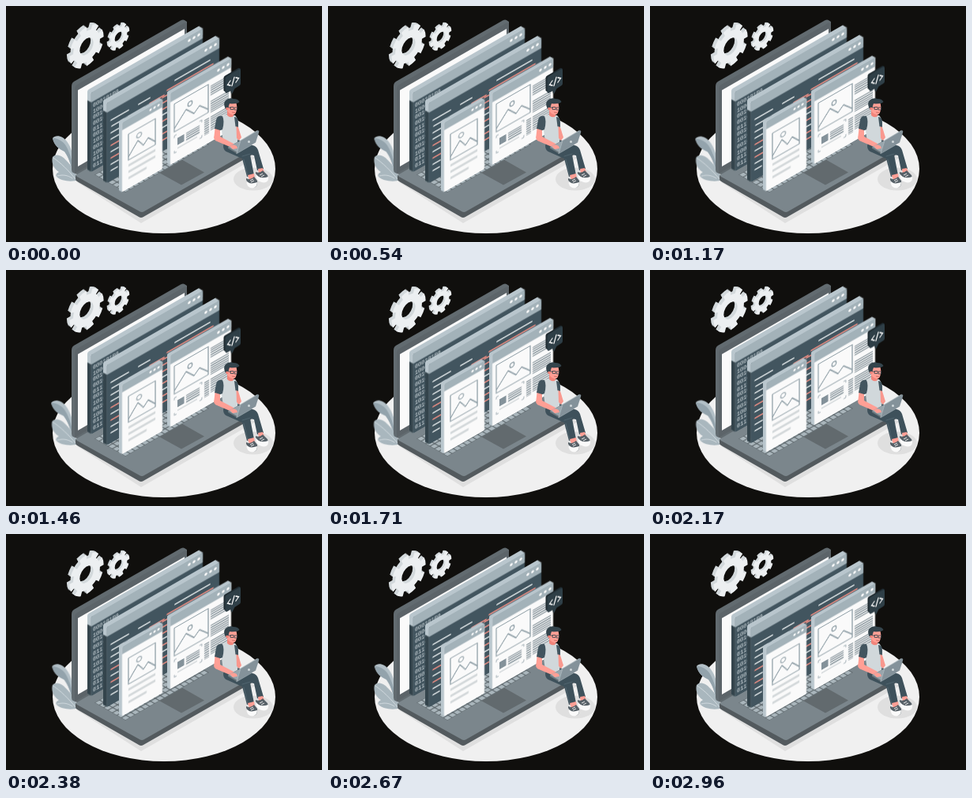
Recreate the animation shown at these times as an HTML page without scripts. Size 400x300 px, loop 3 s.

```html
<!DOCTYPE html>
<html lang="en">
<head>
<meta charset="utf-8">
<title>Coding windows</title>
<style>
html, body { margin: 0; width: 100%; height: 100%; overflow: hidden; background: #100f0d; }
svg { display: block; width: 100vw; height: 100vh; }
.rise { --h: -5px; animation: rise 3s infinite; }
.bubble { --h: -12px; }
.leaf { transform-origin: 84px 220px; animation: sway 3s ease-in-out infinite; }
.low { --a: -1.2deg; }
@keyframes rise {
  0%, 20% { transform: none; animation-timing-function: cubic-bezier(.37, 0, .63, 1); }
  80% { transform: translateY(var(--h)); animation-timing-function: cubic-bezier(.4, 0, .8, .6); }
  100% { transform: translateY(calc(var(--h) * .75)); }
}
@keyframes sway {
  50% { transform: rotate(var(--a, -2deg)); }
}
.bin { font: 6.8px "Liberation Mono", "DejaVu Sans Mono", monospace; fill: #dbe3e7; }
.line { fill: none; stroke-linecap: round; }
.pic { fill: none; stroke: #8d9da5; stroke-width: 1.2; stroke-linejoin: round; }
.top { fill: #b9c6cd; }
.bar { fill: #a3b2b9; }
.dark { fill: #42555f; }
.side { fill: #34444c; }
.pale { fill: #fafafa; }
</style>
</head>
<body>
<svg viewBox="0 0 400 300" xmlns="http://www.w3.org/2000/svg">
<defs>
  <g id="gear" fill="none" stroke="currentColor" transform="rotate(20)">
    <circle r="14.8" stroke-width="9.5"/>
    <circle r="21.5" stroke-width="7" pathLength="16" stroke-dasharray="1.1 .9"/>
  </g>
  <g id="cog">
    <g color="#d3d9dc">
      <use href="#gear" x="-4" y="-4.6"/>
      <use href="#gear" x="-3" y="-3.4"/>
      <use href="#gear" x="-2" y="-2.3"/>
      <use href="#gear" x="-1" y="-1.1"/>
    </g>
    <use href="#gear" color="#eceff1"/>
  </g>
  <pattern id="keys" width="6.2" height="5.6" patternUnits="userSpaceOnUse">
    <rect x=".6" y=".6" width="5" height="4.4" rx=".7" fill="#a9b5bb"/>
  </pattern>
  <pattern id="copy" width="30" height="2.8" patternUnits="userSpaceOnUse">
    <rect width="30" height="1.4" fill="#7c8a92"/>
  </pattern>
  <g id="dots" fill="#fafafa">
    <circle r="1.7"/><circle cx="6" r="1.7"/><circle cx="12" r="1.7"/>
  </g>
</defs>

<rect width="400" height="300" fill="#100f0d"/>
<ellipse cx="200" cy="207" rx="141" ry="82" fill="#f0f0f0"/>
<path d="M90 224 L171 276 L316 193 L290 180Z" fill="#dfdfdf"/>
<ellipse cx="313" cy="220" rx="25" ry="14.5" fill="#dfdfdf"/>

<use href="#cog" transform="translate(102 51.500) matrix(.866 -.5 0 1 0 0)"/>
<use href="#cog" transform="translate(143 39.500) matrix(.53 -.306 0 .612 0 0)"/>

<g class="leaf">
  <path d="M59 168 C63 163 72 165 77 172 C83 180 87 194 88 212 L84 212 C82 200 79 192 74 185 C68 182 61 178 59 168Z" fill="#b3c0c7"/>
  <path d="M59 168 C67 168 75 173 79 184 C83 193 85 203 86 212 L84 212 C82 200 79 192 74 185 C68 182 61 178 59 168Z" fill="#93a3ac"/>
</g>
<g class="leaf low">
  <path d="M59 192 C63 187 71 190 76 196 C83 203 89 213 92 221 C84 224 70 223 64 217 C62 214 65 212 67 211 C61 207 57 200 59 192Z" fill="#a9b7be"/>
  <path d="M60 193 C69 199 79 209 88 220 M65 216 C72 214 78 215 84 219" class="line" stroke="#d5dde1" stroke-width=".9"/>
</g>

<g id="laptop">
  <path d="M83 102 Q83 98 86 96 L221 18.500 Q224 17 226 18 L229 20 V133 L92 215 L85 212 Q83 211 83 208Z" fill="#626b70"/>
  <path d="M87 106 Q87 102 90 100 L225 22 Q229 20 229 24 V131 L87 213Z" fill="#5c6469"/>
  <path d="M91 107 L226 29 V125 L91 204Z" class="pale"/>
  <path d="M88 215 V220 Q88 222 90 223 L168 268 Q171 270 174 268 L310 190 Q313 188 313 181 L172 256Z" fill="#535a5e"/>
  <path d="M90 214 L229 132 L312 180 Q314 182 311 183 L175 261 Q172 263 169 261 L90 217 Q87 215 90 214Z" fill="#7b868c"/>
  <path d="M194 212 L223 195.500 L251 211.500 L222 227.500Z" fill="#626a6e"/>
  <g transform="matrix(1 -.577 1 .577 112 214.500)">
    <rect width="106" height="39.200" fill="#626c71"/>
    <rect width="105.400" height="39.200" fill="url(#keys)"/>
  </g>
</g>

<g class="rise">
  <g transform="translate(108 110) skewY(-30)">
    <path d="M0 101 L-5 95.200 V-4 Q-5 -5.900 -3 -5.900 H136 L141 0 V8Z" class="top"/>
    <path d="M0 101 L-5 95.200 V7 L0 12.500Z" class="side"/>
    <rect width="141" height="101" rx="1.500" class="dark"/>
    <path d="M0 12.500 V1.500 Q0 0 1.500 0 H139 Q141 0 141 2 V12.500Z" class="bar"/>
    <use href="#dots" x="124" y="5.300"/>
    <g class="bin">
      <text x="2" y="20">00010100</text>
      <text x="2" y="27.700">100001</text>
      <text x="2" y="35.400">001010</text>
      <text x="2" y="43.100">001001</text>
      <text x="2" y="50.800">011101</text>
      <text x="2" y="58.500">001010</text>
      <text x="2" y="66.200">101000</text>
      <text x="2" y="73.900">001010</text>
      <text x="2" y="81.600">100100</text>
      <text x="2" y="89.300">011101</text>
      <text x="2" y="97">011110</text>
    </g>
  </g>
</g>

<g class="rise">
  <g transform="translate(128 123) skewY(-30)">
    <path d="M0 102 L-5 96.200 V-4 Q-5 -5.900 -3 -5.900 H137 L142 0 V8Z" class="top"/>
    <path d="M0 102 L-5 96.200 V7 L0 12.500Z" class="side"/>
    <rect width="142" height="102" rx="1.500" class="dark"/>
    <path d="M0 12.500 V1.500 Q0 0 1.500 0 H140 Q142 0 142 2 V12.500Z" class="bar"/>
    <use href="#dots" x="125" y="5.300"/>
    <g class="line" stroke-width="1.700">
      <path d="M5 25h22M40 25h14M86 21h44M6 33h15M27 33h20M5 41h10M5 49h18M5 65h9M68 56h11M5 81h9M68 72h10M5 89h8" stroke="#eef2f4"/>
      <path d="M54 32h18M76 28h58M70 34h10M68 41h12M70 49h10M5 57h11M68 64h12M5 73h11M70 80h9M68 88h11" stroke="#ff9488"/>
    </g>
  </g>
</g>

<g class="rise">
  <g transform="translate(147 148.500) skewY(-30)">
    <path d="M0 88 L-4 83.400 V-3 Q-4 -4.600 -2.500 -4.600 H47 L51 0 V8Z" class="top"/>
    <rect width="51" height="88" rx="1.500" class="pale"/>
    <path d="M0 9.500 V1.500 Q0 0 1.500 0 H49.500 Q51 0 51 1.500 V9.500Z" class="bar"/>
    <use href="#dots" transform="translate(36 4.300) scale(.84)"/>
    <g class="pic">
      <rect x="8" y="19" width="34" height="33"/>
      <path d="M8 48 L20 34 L27 44 L33 38 L42 48"/>
      <circle cx="21.500" cy="28" r="3"/>
    </g>
    <path d="M8 59H42M8 67H42M8 75H31" stroke="#d3d8da" stroke-width="3"/>
  </g>
</g>

<g class="rise">
  <g transform="translate(208 111) skewY(-30)">
    <path d="M0 91 L-4 86.400 V-3 Q-4 -4.600 -2.500 -4.600 H73 L77 0 V8Z" class="top"/>
    <rect width="77" height="91" rx="1.500" class="pale"/>
    <path d="M0 11.500 V1.500 Q0 0 1.500 0 H75.500 Q77 0 77 1.500 V11.500Z" class="bar"/>
    <use href="#dots" x="61" y="5.800"/>
    <g class="pic">
      <rect x="5" y="16.500" width="43" height="35.500"/>
      <path d="M5 48 L20 32 L30 43 L37 37 L48 48"/>
      <circle cx="25" cy="27.500" r="2.800"/>
      <path d="M5 60v-3h3M37 57h3v3M5 76v3h3M37 79h3v-3" stroke-width=".8"/>
    </g>
    <g fill="url(#copy)">
      <rect x="51" y="19.600" width="23" height="13"/>
      <rect x="51" y="39.200" width="23" height="15"/>
      <rect x="51" y="58.800" width="23" height="18"/>
      <rect x="20" y="61.600" width="17" height="11"/>
      <rect x="43" y="58.800" width="6" height="20"/>
    </g>
    <rect x="9" y="62" width="8.500" height="9" fill="#84929a"/>
    <path d="M9 75H34" stroke="#cfd4d7" stroke-width="1.500"/>
  </g>
</g>

<g id="coder">
  <path d="M279 171 C273 175 274 184 281 186 L299 194 L305 217 L314 215 L309 189 L314 190 L318 209 L326 207 L319 183 Q317 178 312 177 L294 171Z" fill="#3e515b"/>
  <path d="M299 191 L309 188 M301 195 L306 216" class="line" stroke="#566a74" stroke-width=".8"/>
  <path d="M306 215 L314 213 L315 219 L308 221Z M319 207 L325 206 L327 211 L320 213Z" fill="#ff9f95"/>
  <path d="M304 219 Q309 222 314 217 L318 222 Q319 229 314 231 Q308 231 304 223Z" fill="#566067"/>
  <path d="M304 221 Q307 228 318 224 Q318 231 312 231.500 Q304 231 304 221Z" class="pale"/>
  <path d="M316 211 Q321 213 325 209 L331 215 Q333 220 329 223 Q321 224 316 215Z" fill="#566067"/>
  <path d="M316 213 Q321 221 332 217 Q333 224 327 224.500 Q316 224 316 213Z" class="pale"/>
  <path d="M309 222l4-2M310 224l4-2M321 215l4-2M323 217l4-2" stroke="#eee" stroke-width="1"/>
  <path d="M270 143 Q274 138 281 138 L290 139 Q294 143 294 151 L293 173 Q284 179 275 173 L273 158Z" fill="#d1d8db"/>
  <path d="M280 133 L288 135 L288 140 Q284 143 280 139Z" fill="#f2857b"/>
  <path d="M289 141 Q294 141 294 148 L294 155 L290.500 153Z" fill="#42555f"/>
  <path d="M291.500 153 L294 154 L298 167 L295 171 L292 168Z" fill="#f9988e"/>
  <path d="M274 140 Q267 139 266 145 L264 156 Q268 160 274 157 Q277 146 274 140Z" fill="#42555f"/>
  <path d="M264.500 156 L271 158 L271 166 L290 176 Q293 179 288 181 L267 172 Q262 170 263.500 165Z" fill="#ff9f95"/>
  <path d="M281 179 L297 171 L311 177 L293 187.500Z" fill="#98a5ac"/>
  <path d="M281 179 L293 186 V188 L281 181Z" fill="#6b777d"/>
  <path d="M283 178 Q288 175 292 178 L293 181 L287 182Z" fill="#ff9f95"/>
  <path d="M292 187.500 L297 171 L318 158.500 Q321 157.500 320 161 L316 173.500Z" fill="#84929a"/>
  <path d="M292 187.500 L297 171 L318 158.500" class="line" stroke="#aab6bc" stroke-width=".9"/>
  <circle cx="307.500" cy="172.500" r="1.500" fill="#d1d8db"/>
  <path d="M278 122 H291 Q293.500 129 291.500 134 Q290 139.500 286 138 Q280 136 278.500 129Z" fill="#ff9f95"/>
  <path d="M277.500 130 Q274.500 123 278 120 Q282 116 288 118 Q294 118 295.500 122 Q292 125 283 124 L281 130 Q280 132.500 278.500 131Z" fill="#34444c"/>
  <circle cx="280" cy="130.500" r="1.800" fill="#f2857b"/>
  <path d="M280.500 128.500 L284.500 129.500 M284.500 128.500h3.500v3h-3.500z M289.500 129h3v3h-3z" class="line" stroke="#34444c" stroke-width=".8"/>
  <path d="M286.500 135.200l3 .3" class="line" stroke="#b95950" stroke-width=".7"/>
</g>

<g class="rise bubble">
  <path d="M275.500 91.500 Q275.500 89.500 277.500 88.500 L293 79.500 Q295 78 297 80 V97.500 Q297 99.500 295 100.500 L289 104.500 L285 111.500 L284 107 L278 109.500 L275.500 107.500Z" fill="#202c32"/>
  <path d="M277.500 92.500 Q277.500 90.500 279.500 89.500 L294.500 80.500 Q297 79.500 297 82.500 V98.500 Q297 100.500 295 101.500 L289.500 105 L286 112 L285 107.500 L280 110.500 Q277.500 111.500 277.500 108.500Z" fill="#2f3f47"/>
  <g transform="translate(287.500 96) skewY(-30)" class="line" stroke="#fafafa" stroke-width="1.400">
    <path d="M-3.500 -3L-7 0L-3.500 3M3.500 -3L7 0L3.500 3M1.500 -4.500L-1.500 4.500"/>
  </g>
</g>
</svg>
</body>
</html>
```
